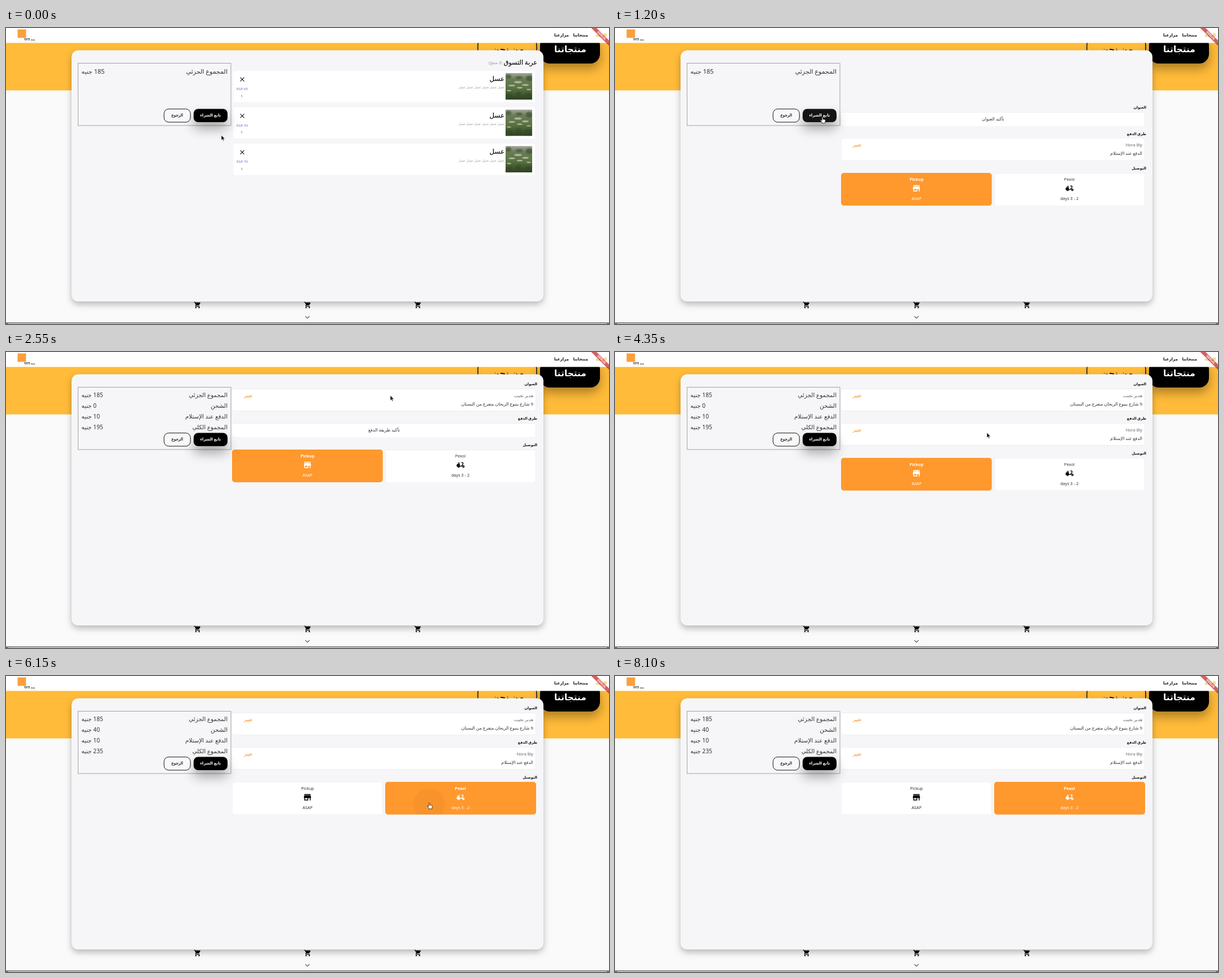
An HTML page for the animation above (8300 ms loop, 1067 px wide and 525 px high).

```html
<!DOCTYPE html>
<html lang="ar">
<head>
<meta charset="utf-8">
<title>عربة التسوق</title>
<style>
html, body { margin: 0; width: 100%; height: 100%; overflow: hidden; background: #fafafa; }
svg { display: block; width: 100vw; height: 100vh; }
text { font: 7.8px "Noto Sans", "DejaVu Sans", sans-serif; direction: rtl; dominant-baseline: middle; fill: #333; }
.left { text-anchor: end; }
.mid { text-anchor: middle; }
.bold { font-weight: 700; }
.semi { stroke: #111; stroke-width: .2; fill: #111; }
.label { font-size: 6.4px; font-weight: 700; fill: #111; }
.nav { font-size: 7.2px; font-weight: 700; fill: #111; }
.latin { font-size: 7.3px; }
.small { font-size: 6.1px; }
.price { fill: #6b5fc7; }
.change { fill: #ff982d; stroke: #ff982d; stroke-width: .15; }
.grey { fill: #666; }
.sum text { font-size: 10.3px; }
.sum .big { font-size: 11px; }
.white, .white text { fill: #fff; }
.card { fill: #fff; filter: drop-shadow(0 .8px .7px #0003); }
.picked { fill: #ff982d; }

/* One 8300 ms loop drives everything */
.anim { animation: 8300ms linear infinite; }
.step { animation: 8300ms step-end infinite; }

.pages { animation-name: pages; }
@keyframes pages {
  0%, 9.639% { transform: translateY(0); }
  15.663%, to { transform: translateY(-424px); }
}
.before-address { animation-name: before-address; }
@keyframes before-address {
  0% { visibility: visible; }
  28.916%, to { visibility: hidden; }
}
.after-address { animation-name: after-address; }
@keyframes after-address {
  0% { visibility: hidden; }
  28.916%, to { visibility: visible; }
}
.free-total { animation-name: free-total; }
@keyframes free-total {
  0% { visibility: hidden; }
  28.916% { visibility: visible; }
  73.494%, to { visibility: hidden; }
}
.pay-label { animation-name: pay-label; }
@keyframes pay-label {
  0% { transform: translateY(0); }
  28.916%, to { transform: translateY(14.7px); }
}
.pay-card { animation-name: pay-card; }
@keyframes pay-card {
  0% { visibility: visible; transform: translateY(0); }
  28.916% { visibility: hidden; transform: translateY(0); }
  52.41%, to { visibility: visible; transform: translateY(14.7px); }
}
.pay-confirm { animation-name: pay-confirm; }
@keyframes pay-confirm {
  0% { visibility: hidden; }
  28.916% { visibility: visible; }
  52.41%, to { visibility: hidden; }
}
.delivery { animation-name: delivery; }
@keyframes delivery {
  0% { transform: translateY(0); }
  52.41%, to { transform: translateY(14.7px); }
}
.pickup-on { animation-name: pickup-on; }
@keyframes pickup-on {
  0% { visibility: visible; }
  73.494%, to { visibility: hidden; }
}
.courier-on { animation-name: courier-on; }
@keyframes courier-on {
  0% { visibility: hidden; }
  73.494%, to { visibility: visible; }
}
.buy-glow { animation-name: buy-glow; }
@keyframes buy-glow {
  0%, 4.82% { opacity: 0; }
  5.42%, 9.04% { opacity: .08; }
  10.24% { opacity: .25; }
  11.45% { opacity: .3; }
  12.65% { opacity: .26; }
  14.46%, 21.08% { opacity: .08; }
  21.69%, to { opacity: 0; }
}
.courier-hover { animation-name: courier-hover; }
@keyframes courier-hover {
  0%, 60.24% { opacity: 0; }
  60.84%, 73.494% { opacity: .045; }
  73.5%, to { opacity: 0; }
}
.splash { animation-name: splash; }
@keyframes splash {
  0%, 73.49% { r: 10px; opacity: 0; }
  73.5% { r: 12px; opacity: .03; }
  77.71% { r: 123px; opacity: .03; }
  80.12% { r: 210px; opacity: .015; }
  81.33%, to { r: 240px; opacity: 0; }
}
.cursor { animation-name: cursor; }
@keyframes cursor {
  0%, 2.41% { transform: translate(381px, 190px); }
  4.82% { transform: translate(372px, 168px); }
  6.63%, 20.48% { transform: translate(367px, 158px); }
  21.69% { transform: translate(395px, 218px); }
  22.29% { transform: translate(470px, 203px); }
  23.49% { transform: translate(620px, 126px); }
  24.7% { transform: translate(677px, 80px); }
  25.3%, 31.93% { transform: translate(680px, 77px); }
  34.94% { transform: translate(673px, 112px); }
  37.35% { transform: translate(664px, 140px); }
  38.55%, 40.96% { transform: translate(662px, 142px); }
  41.57%, 57.83% { transform: translate(658px, 143px); }
  60.24% { transform: translate(684px, 178px); }
  62.65% { transform: translate(704px, 204px); }
  65.06% { transform: translate(731px, 219px); }
  67.47%, 80.12% { transform: translate(749px, 225px); }
  81.93% { transform: translate(738px, 258px); }
  83.13% { transform: translate(722px, 282px); }
  84.34% { transform: translate(700px, 306px); }
  86.75% { transform: translate(525px, 262px); }
  89.16% { transform: translate(290px, 155px); }
  91.57% { transform: translate(125px, 76px); }
  92.77%, 93.37% { transform: translate(75px, 51px); }
  95.18% { transform: translate(58px, 28px); }
  96.99% { transform: translate(38px, 3px); }
  97.59%, to { transform: translate(33px, -20px); }
}
.arrow { animation-name: arrow; }
@keyframes arrow {
  0%, 21.69%, 28.916%, 52.41%, 81.33%, to { visibility: visible; }
  4.82%, 27.11%, 36.75%, 60.84% { visibility: hidden; }
}
.hand { animation-name: hand; }
@keyframes hand {
  0%, 21.69%, 28.916%, 52.41%, 81.33%, to { visibility: hidden; }
  4.82%, 27.11%, 36.75%, 60.84% { visibility: visible; }
}
</style>
</head>
<body>
<svg viewBox="0 0 1067 525" preserveAspectRatio="none">
  <defs>
    <linearGradient id="field" x2="0" y2="1">
      <stop stop-color="#a3a89c"/><stop offset=".22" stop-color="#6b7c58"/>
      <stop offset=".55" stop-color="#5b7442"/><stop offset="1" stop-color="#2c4220"/>
    </linearGradient>
    <clipPath id="view"><rect x="398" y="50" width="544" height="424"/></clipPath>
    <clipPath id="courier-area"><rect x="671" y="173" width="267" height="58" rx="5"/></clipPath>
    <clipPath id="photo-area"><rect x="884" y="80" width="47" height="47"/></clipPath>

    <path id="cart" d="M7 18c-1.1 0-2 .9-2 2s.9 2 2 2 2-.9 2-2-.9-2-2-2zM1 2v2h2l3.6 7.6-1.35 2.45C4.5 15.4 5.5 17 7 17h12v-2H7.42l-.2-.37.9-1.63h7.45c.75 0 1.4-.4 1.75-1.03l3.58-6.49A1 1 0 0020 4H5.21l-.94-2zm16 16c-1.1 0-2 .9-2 2s.9 2 2 2 2-.9 2-2-.9-2-2-2z" transform="scale(.57)"/>
    <path id="store" d="M20 4H4v2h16zm1 10v-2l-1-5H4l-1 5v2h1v6h10v-6h4v6h2v-6zm-9 4H6v-4h6z" transform="translate(525 192) scale(.7)"/>
    <path id="scooter" d="M19 7c0-1.1-.9-2-2-2h-3v2h3v2.65L13.52 14H10V9H6c-2.2 0-4 1.8-4 4v3h2a3 3 0 006 0h4.48L19 10.35zM7 17c-.55 0-1-.45-1-1h2c0 .55-.45 1-1 1zM5 6h5v2H5zm14 7a3 3 0 100 6 3 3 0 000-6zm0 4a1 1 0 110-2 1 1 0 010 2z" transform="translate(796 192) scale(.7)"/>

    <g id="item">
      <rect x="402.5" y="76" width="533.5" height="55.5" rx="2" fill="#fff"/>
      <g clip-path="url(#photo-area)">
        <rect x="884" y="80" width="47" height="47" fill="url(#field)"/>
        <g fill="#34482a" opacity=".6" style="filter:blur(1.2px)">
          <ellipse cx="889" cy="86" rx="5" ry="4"/><ellipse cx="926" cy="89" rx="6" ry="5"/>
          <ellipse cx="908" cy="88" rx="6" ry="2.5"/><ellipse cx="889" cy="122" rx="7" ry="6"/>
          <ellipse cx="907" cy="119" rx="5" ry="6"/><ellipse cx="924" cy="121" rx="7" ry="6"/>
        </g>
        <g fill="#c9d0bd" opacity=".7" style="filter:blur(.5px)">
          <ellipse cx="895" cy="102" rx="6" ry="1.6"/><ellipse cx="906" cy="96" rx="7" ry="2"/>
          <ellipse cx="919" cy="101" rx="6" ry="1.8"/><ellipse cx="909" cy="106" rx="5" ry="1.4"/>
          <ellipse cx="925" cy="109" rx="4" ry="1.2"/><ellipse cx="890" cy="111" rx="4" ry="1.2"/>
        </g>
      </g>
      <path d="M414.5 87.7l7 7m0-7l-7 7" stroke="#111" stroke-width="1.1"/>
      <text class="semi" x="882" y="91" style="font-size:11.8px">عسل</text>
      <text x="882" y="106" style="font-size:5.5px;fill:#999">عسل عسل عسل عسل عسل عسل</text>
      <text class="small mid" x="417" y="121">1</text>
    </g>
    <g id="pickup">
      <use href="#store"/>
      <text class="latin mid" x="533.5" y="219.5">ASAP</text>
    </g>
    <g id="courier">
      <use href="#scooter"/>
      <text class="latin mid" x="804" y="219.5">2 - 3 days</text>
    </g>
  </defs>

  <!-- Page behind the dialog -->
  <rect width="1067" height="525" fill="#fafafa"/>
  <rect y="26" width="1067" height="84.7" fill="#ffbb39"/>
  <rect x="835" y="14" width="104" height="48" rx="17" fill="none" stroke="#111" stroke-width="1.5"/>
  <rect x="945" y="14" width="106" height="49" rx="17" style="filter:drop-shadow(0 9px 9px #0005)"/>
  <text class="bold mid" x="888.5" y="38.5" style="font-size:15px;fill:#111">من نحن</text>
  <text class="bold mid white" x="998.5" y="39" style="font-size:15.4px">منتجاتنا</text>
  <rect width="1067" height="26.5" fill="#fff"/>
  <rect x="20.5" y="2.5" width="15" height="15" fill="#f9a03c"/>
  <text class="bold" x="51.5" y="20.5" style="font-size:4.8px">منذ 1975</text>
  <text class="nav" x="996" y="13">مزارعنا</text>
  <text class="nav" x="1030" y="13">منتجاتنا</text>
  <text class="nav" x="1063" y="13" style="fill:#ffb52e">القمة</text>
  <path d="M1035.6 0h9.4l22 22v9.4z" fill="#b71c1c" opacity=".68"/>
  <text class="bold mid white" transform="translate(1053.7 13.4) rotate(45)" style="font-size:5.6px">DEBUG</text>
  <use href="#cart" x="332" y="484.5"/>
  <use href="#cart" x="527" y="484.5"/>
  <use href="#cart" x="722" y="484.5"/>
  <path d="M529.7 511.2l3.7 3.7 3.7-3.7" fill="none" stroke="#555" stroke-width="1.2"/>
  <rect y="522.5" width="1067" height="1.2" fill="#333"/>
  <path d="M0 524.5h4m1059 0h4" stroke="#777"/>

  <!-- Dialog -->
  <rect x="116" y="39.5" width="835" height="445.5" rx="12" fill="#f6f6f8" style="filter:drop-shadow(0 5px 6px #0004)"/>

  <g clip-path="url(#view)">
    <g class="anim pages">
      <text class="semi" x="940" y="62" style="font-size:11.2px">عربة التسوق</text>
      <text x="878" y="62" style="font-size:7.6px;font-style:italic;fill:#999">(3 منتج)</text>
      <use href="#item"/>
      <use href="#item" y="64.6"/>
      <use href="#item" y="129.2"/>
      <text class="small mid price" x="418" y="108.5">EGP 65</text>
      <text class="small mid price" x="418" y="173.1">EGP 50</text>
      <text class="small mid price" x="418" y="237.7">EGP 70</text>

      <g transform="translate(0 424)">
        <text class="label" x="940" y="57">العنوان</text>
        <g class="step before-address">
          <rect class="card" x="401" y="65.5" width="536.5" height="24.5" rx="3"/>
          <text class="mid" x="669" y="77.7">تأكيد العنوان</text>
        </g>
        <g class="step after-address">
          <rect class="card" x="401" y="65.5" width="536.5" height="38.7" rx="3"/>
          <text class="grey" x="933" y="77.5">هدير نجيب</text>
          <text x="933" y="92.5">9 شارع ينبوع الريحان متفرع من البستان</text>
          <text class="change" x="436" y="77.5">تغيير</text>
        </g>

        <text class="label step pay-label" x="940" y="104">طرق الدفع</text>
        <g class="step pay-confirm">
          <rect class="card" x="401" y="126.5" width="536.5" height="24.5" rx="3"/>
          <text class="mid" x="669" y="138.7">تأكيد طريقة الدفع</text>
        </g>
        <g class="step pay-card">
          <rect class="card" x="401" y="112" width="536.5" height="38.7" rx="3"/>
          <text class="grey latin" x="933" y="124.3">Nora Bly</text>
          <text x="933" y="139.3">الدفع عند الإستلام</text>
          <text class="change" x="436" y="124.3">تغيير</text>
        </g>

        <g class="step delivery">
          <text class="label" x="940" y="165.5">التوصيل</text>
          <rect class="card" x="401" y="173.5" width="265.5" height="57.5" rx="4"/>
          <rect class="card" x="671.5" y="173.5" width="266" height="57.5" rx="4"/>
          <g class="step pickup-on">
            <rect class="picked" x="400" y="173" width="266.7" height="58" rx="5"/>
            <g class="white">
              <text class="latin bold mid" x="533.5" y="185">Pickup</text>
              <use href="#store"/>
              <text class="latin mid" x="533.5" y="219.5">ASAP</text>
            </g>
            <text class="latin mid" x="804" y="185">Pexol</text>
            <use href="#courier"/>
          </g>
          <g class="step courier-on">
            <rect class="picked" x="671" y="173" width="267" height="58" rx="5"/>
            <g class="white">
              <text class="latin bold mid" x="804" y="185">Pexol</text>
              <use href="#scooter"/>
              <text class="latin mid" x="804" y="219.5">2 - 3 days</text>
            </g>
            <text class="latin mid" x="533.5" y="185">Pickup</text>
            <use href="#pickup"/>
          </g>
          <g clip-path="url(#courier-area)">
            <rect class="anim courier-hover" x="671" y="173" width="267" height="58" opacity="0"/>
            <circle class="anim splash" cx="749" cy="213" r="10" opacity="0"/>
          </g>
        </g>
      </g>
    </g>
  </g>

  <!-- Order summary -->
  <rect x="127.5" y="62.5" width="270.5" height="110.5" fill="none" stroke="#a2a2a2"/>
  <g class="sum">
    <g class="step before-address">
      <text class="big" x="392" y="78.5">المجموع الجزئي</text>
      <text class="left big" x="133.5" y="78.5">185 جنيه</text>
    </g>
    <g class="step after-address">
      <text x="392" y="77.5">المجموع الجزئي</text>
      <text x="392" y="96.5">الشحن</text>
      <text x="392" y="115.5">الدفع عند الإستلام</text>
      <text x="392" y="134.5">المجموع الكلي</text>
      <text class="left" x="133.5" y="77.5">185 جنيه</text>
      <text class="left" x="133.5" y="115.5">10 جنيه</text>
    </g>
    <g class="step free-total">
      <text class="left" x="133.5" y="96.5">0 جنيه</text>
      <text class="left" x="133.5" y="134.5">195 جنيه</text>
    </g>
    <g class="step courier-on">
      <text class="left" x="133.5" y="96.5">40 جنيه</text>
      <text class="left" x="133.5" y="134.5">235 جنيه</text>
    </g>
  </g>
  <rect x="332" y="143.5" width="60" height="23.5" rx="8" style="filter:drop-shadow(0 12px 10px #0005)"/>
  <rect x="279.7" y="143.7" width="46.6" height="23.3" rx="8" fill="#f8f8fa" stroke="#111"/>
  <text class="mid semi" x="303" y="155.5" style="font-size:7.1px">الرجوع</text>
  <rect class="anim buy-glow white" x="332" y="143.5" width="60" height="23.5" rx="8" opacity="0"/>
  <text class="mid bold white" x="362" y="155.5" style="font-size:7px">تابع الشراء</text>

  <g class="anim cursor">
    <path class="step arrow" d="M0 0V9.2L2.1 7.2 3.6 10.6 5 10 3.6 6.7H6.5Z" fill="#111" stroke="#fff" stroke-width=".6"/>
    <path class="step hand" d="M-.9.8C-.9-.3.9-.3.9.8V3.8L4.6 4.6Q5.6 4.9 5.4 6L4.8 9V10.8H-.6V9.4L-3.6 6Q-3.4 4.8-2.2 5.3L-.9 6.3Z" fill="#fff" stroke="#222" stroke-width=".8"/>
  </g>
</svg>
</body>
</html>
```
